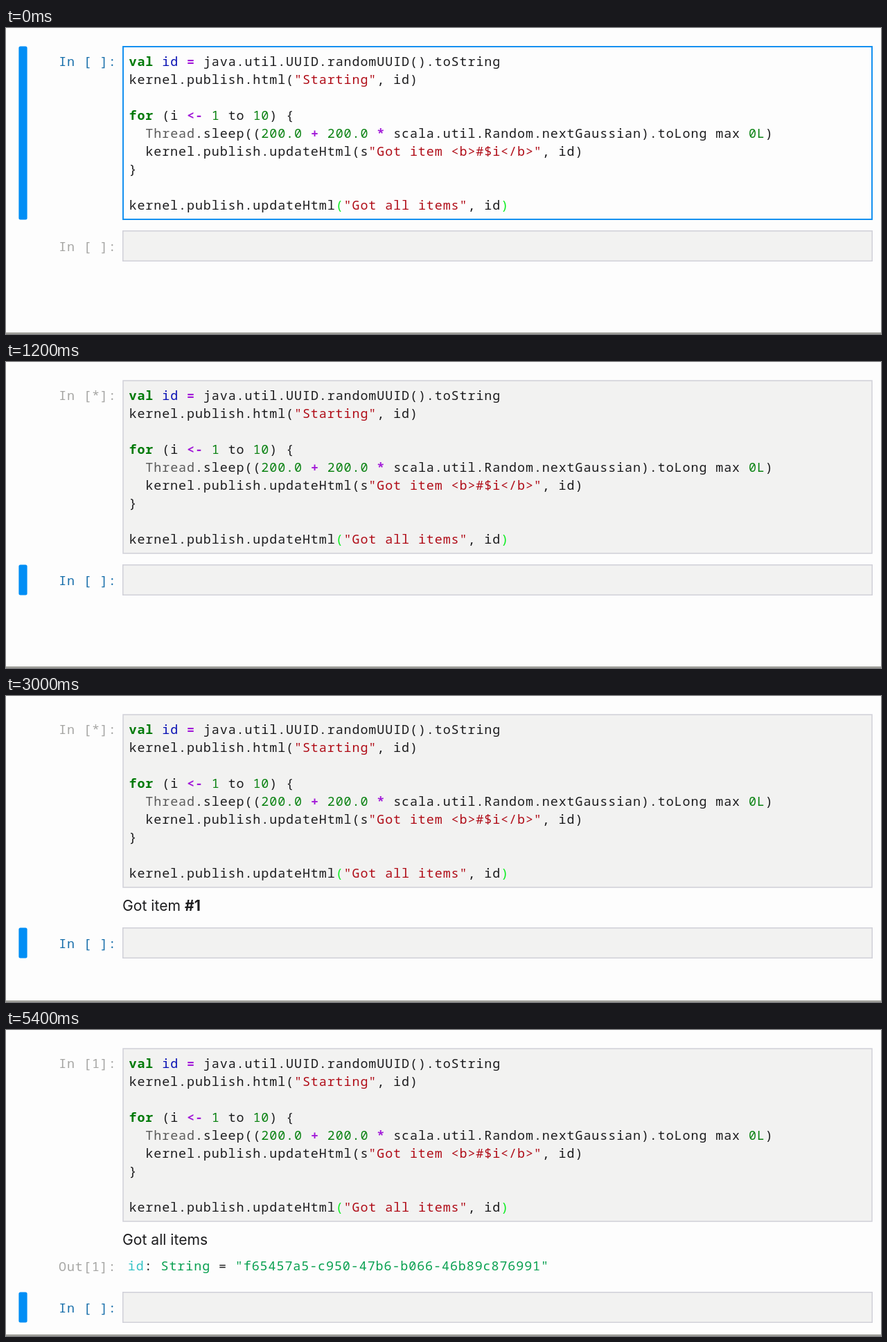
Write an HTML page that moves like this. It is 1263 px wide and 443 px high and loops after 5.5 s.

```html
<!DOCTYPE html>
<html lang="en">
<head>
<meta charset="utf-8">
<title>Notebook cell with live output</title>
<style>
  html, body { margin: 0; width: 100%; height: 100%; overflow: hidden; background: #fdfdfd; }
  svg { display: block; width: 1263px; height: 443px; }
  text { white-space: pre; fill: #1c1c1e; }
  .code { font: 18.4px "Noto Sans Mono", monospace; letter-spacing: .89px; font-variant-ligatures: none; }
  .html { font: 21.15px Inter, sans-serif; }
  .cell { fill: #f2f2f1; stroke: #d0d0d8; stroke-width: 1.5; }
  .cell.edit { fill: #fdfdfd; stroke: #1490f0; stroke-width: 2; }
  .bar { fill: #018ef5; }
  .prompt { fill: #a6a6a4; }
  .prompt.active { fill: #1a70ab; }
  .kw { fill: #007a08; font-weight: bold; }
  .op { fill: #a21ad8; font-weight: bold; }
  .def { fill: #0a12b4; }
  .num { fill: #0a8212; }
  .str { fill: #b00d18; }
  .type { fill: #5a5a5a; }
  .match { fill: #0cee20; }
  .name { fill: #35c3c6; }
  .val { fill: #08a050; }
</style>
</head>
<body>
<svg viewBox="0 0 1263 443">
  <rect id="bar" class="bar" x="18.4" width="12.2" rx="2.5"/>
  <rect id="input" class="cell" x="169" y="27" width="1081" height="250"/>
  <text id="prompt" class="code prompt" x="76.2" y="55"></text>
  <g class="code">
    <text x="177.5" y="55"><tspan class="kw">val</tspan> <tspan class="def">id</tspan> <tspan class="op">=</tspan> java.util.UUID.randomUUID().toString</text>
    <text x="177.5" y="81">kernel.publish.html(<tspan class="str">"Starting"</tspan>, id)</text>
    <text x="177.5" y="133"><tspan class="kw">for</tspan> (i <tspan class="op">&lt;-</tspan> <tspan class="num">1</tspan> to <tspan class="num">10</tspan>) {</text>
    <text x="177.5" y="159">  <tspan class="type">Thread</tspan>.sleep((<tspan class="num">200.0</tspan> <tspan class="op">+</tspan> <tspan class="num">200.0</tspan> <tspan class="op">*</tspan> scala.util.Random.nextGaussian).toLong max <tspan class="num">0L</tspan>)</text>
    <text x="177.5" y="185">  kernel.publish.updateHtml(s<tspan class="str">"Got item &lt;b&gt;#$i&lt;/b&gt;"</tspan>, id)</text>
    <text x="177.5" y="211">}</text>
    <text x="177.5" y="263">kernel.publish.updateHtml<tspan class="match">(</tspan><tspan class="str">"Got all items"</tspan>, id<tspan class="match">)</tspan></text>
  </g>
  <text class="html" x="168" y="311"><tspan id="label"></tspan><tspan id="count" font-weight="bold"></tspan></text>
  <g id="result" class="code">
    <text class="prompt" x="76" y="349">Out[1]:</text>
    <text x="175.8" y="348"><tspan class="name">id</tspan>: <tspan class="val">String</tspan> = <tspan class="val">"f65457a5-c950-47b6-b066-46b89c876991"</tspan></text>
  </g>
  <g id="next">
    <rect class="cell" x="168.75" y="293.75" width="1081.5" height="43.5"/>
    <text id="nextPrompt" class="code prompt" x="76.2" y="322.5">In [ ]:</text>
  </g>
  <rect y="441" width="1263" height="1.5" fill="#76766f"/>
</svg>
<script>
  const LOOP = 5500, RUN = 1200, OUTPUT = 2700, ALL = 4700, DONE = 4800;
  const ITEMS = [2900, 3200, 3500, 3700, 3900, 4000, 4200, 4300, 4400, 4500];

  const $ = id => document.getElementById(id);
  const put = (id, text) => { if ($(id).textContent !== text) $(id).textContent = text; };
  const set = (id, attrs) => { for (const k in attrs) $(id).setAttribute(k, attrs[k]); };

  function render(t) {
    const running = t >= RUN, done = t >= DONE;
    const shift = done ? 86 : t >= OUTPUT ? 42 : 0;
    const item = t < ALL ? ITEMS.filter(at => t >= at).length : 0;

    set("input", { class: running ? "cell" : "cell edit" });
    set("prompt", { class: running ? "code prompt" : "code prompt active" });
    set("nextPrompt", { class: running ? "code prompt active" : "code prompt" });
    set("bar", running ? { y: 293.4 + shift, height: 44.2 } : { y: 26.4, height: 251.2 });
    set("next", { transform: `translate(0 ${shift})` });
    set("result", { visibility: done ? "visible" : "hidden" });

    put("prompt", `In [${done ? 1 : running ? "*" : " "}]:`);
    put("label", t < OUTPUT ? "" : t >= ALL ? "Got all items" : item ? "Got item " : "Starting");
    put("count", item ? "#" + item : "");
  }

  const start = performance.now();
  function tick() {
    render((performance.now() - start) % LOOP);
    requestAnimationFrame(tick);
  }
  tick();
</script>
</body>
</html>
```
